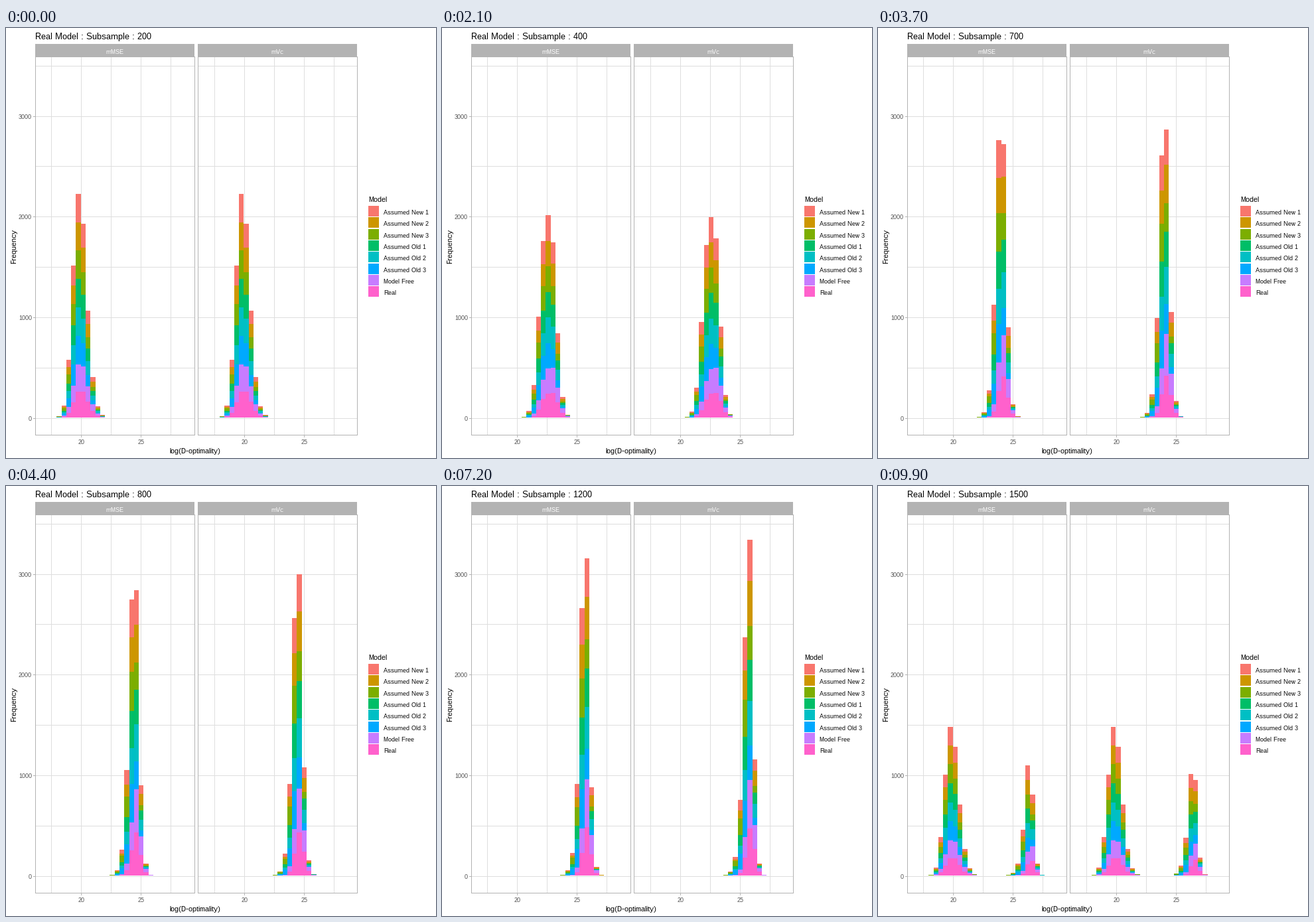
Write a matplotlib script that moves like this. It is 648 px wide and 648 px high and loops after 10 s.

```python
import math

import matplotlib.pyplot as plt
import numpy as np
from matplotlib.animation import FuncAnimation
from matplotlib.collections import PolyCollection
from matplotlib.patches import Rectangle

SIZE = 648
FRAMES = 100
plt.rcParams.update({"font.family": "Liberation Sans",
                     "text.hinting": "native", "text.hinting_factor": 1})

MODELS = ["Assumed New 1", "Assumed New 2", "Assumed New 3", "Assumed Old 1",
          "Assumed Old 2", "Assumed Old 3", "Model Free", "Real"]
COLORS = ["#F8766D", "#CD9600", "#7CAE00", "#00BE67",
          "#00BFC4", "#00A9FF", "#C77CFF", "#FF61CC"]
# How strongly each model leans towards high values
TILT = np.array([-0.2, 0.12, -0.75, -0.2, 0.05, -0.68, 0.82, 1.0])
LEVELS = list(range(200, 1501, 100))
TOTAL = 8000

EDGES = np.arange(-6, 20)
BINS = EDGES[:-1]
Z = np.linspace(-3.9, 3.9, 781)
PHI = np.array([0.5 * (1 + math.erf(z / math.sqrt(2))) for z in Z])


def totals(n, drift):
    """Bin counts of a skewed bell that moves and narrows with log(n)."""
    u = math.log(n / 200)
    mid = -0.2 + (8.42 + drift) * u - 0.265 * u * u
    spread = 1.39 - 0.45 * u + 0.092 * u * u
    skew = 0.05 - 0.075 * u
    tail = 0.01 + 0.014 * u
    x = mid + spread * Z + skew * Z**2 + tail * Z**3
    return np.diff(np.interp(EDGES, x, PHI, left=0, right=1)) * TOTAL


def split(total, n):
    """Share the bins among the models, each model having equal mass."""
    mean = (BINS * total).sum() / total.sum()
    slope = 0.67 * (1 - math.exp(-(n - 100) / 480))
    cells = np.exp(slope * np.outer(TILT, BINS - mean)) * total
    for _ in range(60):
        cells *= (TOTAL / 8) / cells.sum(axis=1, keepdims=True)
        cells *= total / np.maximum(cells.sum(axis=0), 1e-9)
    return cells


STATES = [np.array([split(totals(n, drift), n) for drift in (0, 0.08)])
          for n in LEVELS]


def phase(frame):
    """Previous state, next state and progress between them."""
    starts = [4 + 8 * i if i < 3 else 28 + 7 * (i - 3)
              for i in range(len(LEVELS))]
    past = [i for i, s in enumerate(starts) if s <= frame]
    if not past:
        return 0, 0, 1.0
    i = past[-1]
    steps = 4 if i < 3 else 3
    p = min(1.0, (frame - starts[i] + 1) / steps)
    return i, (i + 1) % len(LEVELS), p


def y_px(v):
    return np.floor(588 - v * 0.15167)


X_EDGES = [np.floor(113.25 + dx + 7.28 * EDGES) for dx in (0, 245.6)]


def bar_verts(cells):
    verts = []
    for panel, x in zip(cells, X_EDGES):
        # Stack upwards from the last model
        tops = np.cumsum(panel[::-1], axis=0)[::-1]
        y = np.minimum(y_px(np.vstack([tops, 0 * tops[:1]])), 587)
        for m in range(len(MODELS)):
            for b in range(len(BINS)):
                l, r, t, u = x[b], x[b + 1], y[m, b], y[m + 1, b]
                verts.append([(l, u), (r, u), (r, t), (l, t)])
    return verts


fig = plt.figure(figsize=(9, 9), dpi=72, facecolor="white")
ax = fig.add_axes([0, 0, 1, 1])
ax.set_xlim(0, SIZE)
ax.set_ylim(SIZE, 0)
ax.axis("off")

GRID, EDGE, GREY = "#DEDEDE", "#B3B3B3", "#4D4D4D"


def box(x, y, w, h, color, z=1):
    ax.add_patch(Rectangle((x, y), w, h, fc=color, lw=0, zorder=z,
                           antialiased=False))


def text(x, y, s, size, color="black", ha="left", **kw):
    return ax.text(x, y, s, fontsize=size, color=color, ha=ha,
                   va="baseline", **kw)


def draw_panel(left, x20, name):
    for value in range(0, 3501, 500):
        box(left, y_px(value - 1), 241, 1, GRID)
    for i in range(-1, 4):
        box(x20 + 45 * i, 43, 1, 571, GRID)
    for y in (43, 613):
        box(left, y, 241, 1, EDGE, 4)
    for x in (left, left + 240):
        box(x, 43, 1, 571, EDGE, 4)
    box(left, 24, 240, 20, EDGE, 4)
    text(left + 119.5, 39, name, 9, "white", "center", zorder=5)
    for i, label in enumerate(("20", "25")):
        x = x20 + 90 * i
        box(x, 614, 1, 3, EDGE)
        text(x + 0.5, 627, label, 9, GREY, "center")


draw_panel(44, 113, "mMSE")
draw_panel(289, 359, "mVc")

for value in range(0, 3001, 1000):
    y = y_px(value - 1)
    box(41, y, 3, 1, EDGE)
    text(39, y + 4, str(value), 9, GREY, "right")

text(284.5, 641, "log(D-optimality)", 11, ha="center")
text(15, 329, "Frequency", 11, ha="center", rotation=90,
     rotation_mode="anchor")

text(546, 262, "Model", 11)
for i, (label, color) in enumerate(zip(MODELS, COLORS)):
    y = round(268.15 + 17.28 * i)
    box(546, y, 16, 16, color)
    text(569, y + 13, label, 9)

title = text(44, 17, "", 13)
bars = PolyCollection(bar_verts(STATES[0]), linewidths=0, edgecolors="none",
                      facecolors=[c for _ in range(2) for c in COLORS
                                  for _ in BINS],
                      antialiaseds=False, zorder=3)
ax.add_collection(bars, autolim=False)


def update(frame):
    a, b, p = phase(frame)
    bars.set_verts(bar_verts((1 - p) * STATES[a] + p * STATES[b]))
    shown = LEVELS[b] if p > 0.7 else LEVELS[a]
    title.set_text(f"Real Model : Subsample : {shown}")
    return bars, title


anim = FuncAnimation(fig, update, frames=FRAMES, interval=100, repeat=True,
                     repeat_delay=0, blit=False)
plt.show()
```
